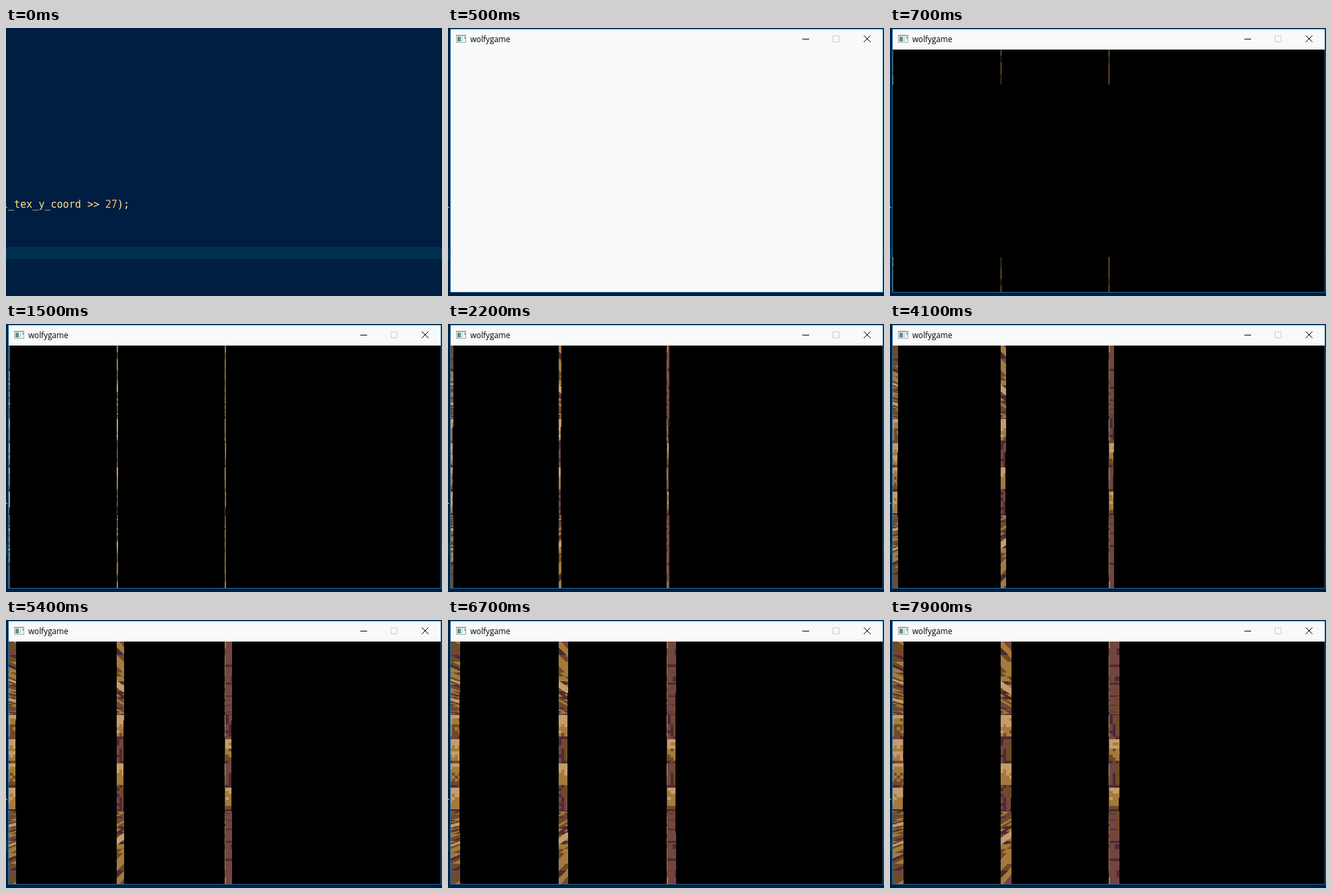
These frames come from a looping animation (646 by 398 pixels, 8 s). An HTML page with a canvas:

```html
<!DOCTYPE html>
<html lang="en">
<head>
<meta charset="utf-8">
<style>
html, body { margin: 0; width: 100%; height: 100%; overflow: hidden; background: #001e42; }
canvas { display: block; }
</style>
</head>
<body>
<canvas id="stage" width="646" height="398"></canvas>
<script>
const ctx = document.getElementById('stage').getContext('2d');
const LOOP = 8000, OPEN = 500, RENDER = 700, STEP = 100;
const TOP = 32, BOTTOM = 392, MID = 212, PLANE = 108, WALL = 144;
const LIGHT = '#c59c6b', OCHRE = '#a57a3c', BROWN = '#6e4b27', RED = '#74453e', PURPLE = '#492c35';

const rect = (color, x, y, w, h) => {
  ctx.fillStyle = color;
  ctx.fillRect(x, y, w, h);
};

const text = (str, x, y, color, font) => {
  ctx.font = font;
  ctx.fillStyle = color;
  ctx.fillText(str, x, y);
};

const noise = (x, y) => {
  const n = Math.sin(x * 12.9898 + y * 78.233) * 43758.5453;
  return n - Math.floor(n);
};

const mod = (n, m) => ((n % m) + m) % m;

// Staggered bricks: dark left end, lit top edge, mortar below.
function brick(x, y) {
  const odd = mod(Math.floor(y / 8), 2);
  const u = mod(x + odd * 4, 16), v = mod(y, 8), n = noise(x, y);
  if (v === 7) return n < 0.25 ? RED : PURPLE;
  if (u === 0) return n < 0.2 ? PURPLE : RED;
  if (u === 1) return v < 3 ? RED : PURPLE;
  if (u < 4) return n < 0.25 ? RED : BROWN;
  if (v === 0) return LIGHT;
  const shade = n * 0.45 + (7 - v) * 0.07 + (u > 11 ? 0.2 : u > 8 ? -0.12 : 0.06);
  return shade > 0.7 ? LIGHT : shade > 0.36 ? OCHRE : BROWN;
}

// Floor and ceiling share one pattern laid out in depth.
function slab(x, z) {
  const u = mod(x, 32), n = noise(x, z >> 1);
  if (u < 2) return mod(z, 8) === 3 || n < 0.15 ? PURPLE : RED;
  if (u < 4) return BROWN;
  if (u === 18 || u === 19) return n < 0.7 ? RED : BROWN;
  if (u === 28 || u === 7) return PURPLE;
  if (u === 9 || u === 10) return LIGHT;
  if (u > 19 && u < 24 && n > 0.7) return LIGHT;
  return n < 0.1 ? PURPLE : n < 0.48 ? BROWN : OCHRE;
}

// Draws the first `count` samples of one screen column.
function column(sx, count) {
  const off = sx - 324;
  for (let i = 0; i < Math.min(count, PLANE); i++) {
    const r = MID - TOP - i;
    const color = slab(Math.floor(off * 16 / r - 0.1), Math.floor(5120 / r));
    rect(color, sx, TOP + i, 1, 1);
    rect(color, sx, BOTTOM - 1 - i, 1, 1);
  }
  for (let i = 0; i < Math.min(count - PLANE, WALL); i++) {
    const y = TOP + PLANE + i;
    rect(brick(Math.floor(off / 4.5 - 0.2), Math.floor((y - 141) / 4.5)), sx, y, 1, 1);
  }
}

function editor() {
  rect('#001e42', 0, 0, 646, 398);
  rect('#00304f', 0, 325, 646, 18);
  const font = '15px "DejaVu Sans Mono", monospace';
  [['l_tex_y_coord >> ', -6, '#ffe187'], ['27', 147, '#ffb06b'], [');', 165, '#ffe9a8']]
    .forEach(([str, x, color]) => text(str, x, 267, color, font));
}

function appWindow() {
  rect('#1b6d9c', 3, 1, 642, 392);
  rect('#f8faf9', 4, 2, 640, 390);
  rect('#a5a9ad', 12, 10, 15, 12);
  rect('#f4f6f7', 13, 12, 13, 9);
  rect('#5c9284', 14, 13, 5, 7);
  rect('#c5dbd4', 20, 13, 2, 7);
  rect('#8fa9c4', 24, 13, 2, 3);
  text('wolfygame', 33, 21, '#000', '11.7px "Open Sans", sans-serif');
  rect('#000', 525, 16, 10, 1);
  ctx.lineWidth = 1;
  ctx.strokeStyle = '#cbcdcc';
  ctx.strokeRect(570.5, 11.5, 9, 9);
  ctx.strokeStyle = '#000';
  ctx.beginPath();
  ctx.moveTo(616, 11); ctx.lineTo(626, 21);
  ctx.moveTo(626, 11); ctx.lineTo(616, 21);
  ctx.stroke();
}

function draw(t) {
  editor();
  if (t < OPEN) return;
  appWindow();
  if (t < RENDER) return;
  rect('#000', 4, TOP, 640, BOTTOM - TOP);
  const done = 52 + 55 * Math.floor((t - RENDER) / STEP);
  const perColumn = PLANE + WALL;
  for (const left of [4, 164, 324]) {
    for (let c = 0; c * perColumn < done; c++) column(left + c, done - c * perColumn);
  }
}

let last = -1;
function tick(now) {
  const t = Math.floor((now % LOOP) / STEP) * STEP;
  if (t !== last) draw(last = t);
  requestAnimationFrame(tick);
}
requestAnimationFrame(tick);
</script>
</body>
</html>
```
